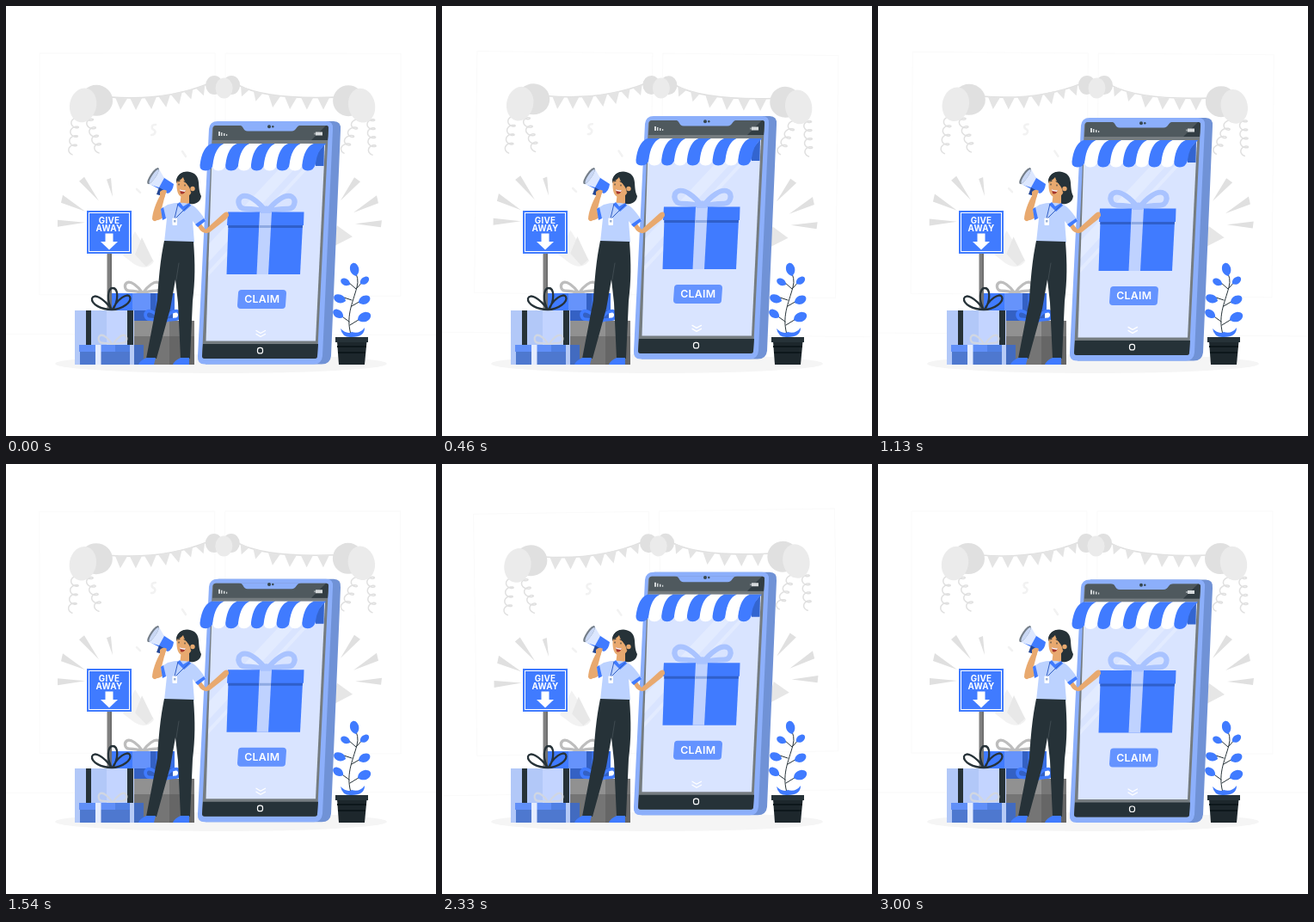
An HTML page for the animation above (3040 ms loop, 500x500 px).

```html
<!DOCTYPE html>
<html lang="en">
<head>
<meta charset="utf-8">
<title>Giveaway</title>
<style>
html, body { margin: 0; width: 100%; height: 100%; overflow: hidden; background: #fff; }
svg { display: block; width: 100vw; height: 100vh; }
text { font-family: Inter, "Open Sans", sans-serif; font-weight: 700; fill: #fff; text-anchor: middle; }
.line { fill: none; stroke-linecap: round; stroke-linejoin: round; }
.blue { fill: #407bff; }
.dark { fill: #263238; }
.skin { fill: #e8a96f; }
.pale { fill: #ebebeb; }
.grey { fill: #e0e0e0; }
</style>
</head>
<body>
<svg viewBox="0 0 500 500">
  <defs>
    <path id="bow" class="line" d="M0 0C-6-9-15-16-20-13C-24-10-22-3-17-3C-10-3-5-2 0 0C5-2 10-3 17-3C22-3 24-10 20-13C15-16 6-9 0 0"/>
    <path id="leaf" class="blue" d="M0 0C1-6 7-9 12-8C18-7 18-1 13 2C8 5 3 3 0 0Z"/>
    <clipPath id="glass"><path d="M240 160H371L360 389.500H232.500Z"/></clipPath>
  </defs>

  <g id="scene">
    <g class="line" stroke="#fafafa">
      <path d="M39 55H243V336H39ZM255 55H459V337H255ZM0 382H500"/>
    </g>
    <path d="M150 262L172 297C166 306 157 305 149 300L136 290Z" fill="#f2f2f2"/>
    <path d="M158 269L171 296L163 303L150 289Z" fill="#e8e8e8"/>
    <path d="M385 255L403 268L378 281Z" fill="#e6e6e6"/>
    <g class="line" stroke="#f2f2f2" stroke-width="2.500">
      <path d="M174 138C168 138 169 143 172 144C175 146 173 150 169 150M205 169L209 175M152 213L156 217"/>
    </g>
    <g class="grey">
      <path d="M91 199L85 204L108 227ZM122 200L117 202L124 222ZM66 220L64 229L92 239ZM60 249V257L92 252Z"/>
      <path d="M405 199L412 204L389 226ZM431 220L433 229L404 240ZM437 249L436 257L406 253Z"/>
    </g>
    <g class="line" stroke="#e0e0e0" stroke-width="1.600">
      <path d="M120 106Q185 111 236 90M270 92Q302 109 384 106"/>
    </g>
    <g id="flags" fill="#e4e4e4"></g>
    <g id="curls" class="line" stroke="#e0e0e0" stroke-width="1.500"></g>
    <g class="grey">
      <ellipse cx="105" cy="110" rx="19" ry="18"/><ellipse cx="398" cy="110" rx="18" ry="18"/>
      <ellipse cx="242" cy="92" rx="10" ry="11"/><ellipse cx="262" cy="92" rx="10" ry="11"/>
    </g>
    <g class="pale">
      <ellipse cx="89.500" cy="115.500" rx="15.500" ry="20" transform="rotate(12 89.500 115.500)"/>
      <ellipse cx="413.500" cy="115.500" rx="15.500" ry="20" transform="rotate(-12 413.500 115.500)"/>
      <ellipse cx="253.500" cy="95.500" rx="10" ry="12"/>
    </g>
  </g>

  <ellipse cx="250" cy="416" rx="193" ry="11" fill="#f5f5f5"/>

  <g id="phone">
    <path d="M247 134H381Q390 134 389 144L378 407Q377 416.500 367 416.500H232Z" fill="#7092d6"/>
    <path d="M246 134H372Q381 134 380 143L368 407Q367 416.500 358 416.500H231Q222 416.500 223 407L236 143Q237 134 246 134Z" fill="#8caffb"/>
    <path d="M244 139H372Q375 139 375 142L362 407Q362 410 359 410H231Q228 410 228 407L240 142Q241 139 244 139Z" fill="#757c80"/>
    <path d="M244 139H372Q375 139 375 142L374 156H240L241 142Q241 139 244 139Z" fill="#4f595e"/>
    <path d="M372 139Q375 139 375 142L374 156H355Z" fill="#323d43"/>
    <path d="M229 393H363L362 407Q362 410 359 410H231Q228 410 228 407Z" class="dark"/>
    <path d="M240 160H371L360 389.500H232.500Z" fill="#d9e4ff"/>
    <path d="M271 138.500C277 139 275 145.500 281 145.500H332C338 145.500 337 139 343 138.500Z" fill="#8caffb"/>
    <circle cx="306" cy="140.300" r="2" fill="#37474f"/><circle cx="310.300" cy="140.300" r="1.200" fill="#37474f"/>
    <path d="M247 146h2v5h-2zM250 147h1.500v4H250zM253 148h1.500v3H253zM256 149h1.200v2H256zM360 146.500h8v4h-8zM358.500 147.500h1v2h-1z" fill="#d5d9db"/>
    <g fill="#fff" opacity=".25" clip-path="url(#glass)">
      <path d="M348 157L370 137L382 139L230 304V283Z"/><path d="M380 152V158L228 322V316Z"/>
    </g>

    <path d="M370 161L369.500 186H360Q358 181 362 171Z" fill="#3365d0"/>
    <g id="awning"></g>

    <g stroke="#a9c3ff" stroke-width="4.200" transform="translate(303 240) scale(1.470 1.400)"><use href="#bow"/></g>
    <path d="M258.500 254H345L342 312H256.500Z" class="blue"/>
    <path d="M258.500 254H345L344.700 258H258.300Z" fill="#2f5fca"/>
    <path d="M258 239.500H346.500L346 255H257Z" class="blue"/>
    <path d="M295 239.500H309L305 312H291.500Z" fill="#bfd2ff"/>
    <path d="M294.500 255H308L307.800 258H294.300Z" fill="#8faae2"/>
    <path d="M296 234Q303 231 309 234L308 241H296Z" fill="#a9c3ff"/>

    <path d="M274 330H322Q326 330 326 334L325 348Q325 352 321 352H273Q269 352 269 348L270 334Q270 330 274 330Z" fill="#6493ff"/>
    <text x="297.800" y="345.400" font-size="12.300" letter-spacing=".3" style="font-weight:600">CLAIM</text>
    <path class="line" stroke="#fff" stroke-width="1.300" d="M291 377.500L296 380.500L301.500 377.500M291 381.500L296 384.500L301.500 381.500"/>
    <rect x="292.500" y="397.500" width="6" height="6.500" rx="2.500" fill="none" stroke="#fff" stroke-width="1.200"/>
  </g>

  <!-- presents -->
  <g stroke="#bdbdbd" stroke-width="3.500" transform="translate(159 334) scale(.930)"><use href="#bow"/></g>
  <path d="M121 334H147V354H121Z" class="blue"/>
  <path d="M123 354H194V366H123Z" fill="#3461c4"/>
  <path d="M147 334H168V354H147Z" fill="#6693fb"/>
  <path d="M168 334H196V354H168Z" fill="#3a6fe4"/>
  <path d="M168 334H174V366H168Z" fill="#3461c4"/>
  <path d="M146 366H219V417H146Z" fill="#757575"/>
  <path d="M146 366H190V384H146Z" fill="#919191"/>
  <path d="M190 366H219V384H190Z" fill="#777"/>
  <path d="M190 384H219V417H190Z" fill="#666"/>
  <path d="M204 366H210V417H204Z" fill="#555"/>
  <g stroke="#407bff" stroke-width="4" transform="translate(182 367) scale(.900)"><use href="#bow"/></g>

  <path d="M117.500 286H123V355H117.500Z" fill="#808080"/>
  <path d="M121 286H123V355H121Z" fill="#707070"/>
  <rect x="94" y="238" width="52" height="50" class="blue"/>
  <rect x="96.500" y="240.500" width="47" height="45" fill="none" stroke="#fff"/>
  <text x="120" y="253" font-size="9.800" letter-spacing=".25">GIVE</text>
  <text x="120" y="262" font-size="9.800" letter-spacing=".25">AWAY</text>
  <path d="M115.500 264.500H124.500V274H130L120 283.500L110 274H115.500Z" fill="#fff"/>

  <path d="M80 354H149V417H80Z" fill="#b2c8f8"/>
  <path d="M117 354H149V396H117Z" fill="#c3d4ff"/>
  <path d="M93 354H99V394H93ZM141 354H148V394H141Z" class="dark"/>
  <path class="line" stroke="#263238" stroke-width="2.300" transform="translate(123 353)"
    d="M0 0C-10-14-21-19-23-13C-24-6-12 0 0 0C-6-10-5-25 1-25C8-25 8-10 1 0C6-12 18-20 21-15C24-9 12 0 0 0"/>
  <g stroke="#d0d6e2" stroke-width="2.800" transform="translate(124 394) scale(.740 .820)"><use href="#bow"/></g>
  <path d="M85 394H160V402H85Z" fill="#608ff8"/>
  <path d="M86 402H159V417H86Z" fill="#4e78cf"/>
  <path d="M127 394H145V402H127Z" fill="#5080e4"/>
  <path d="M104 394H110.500V417H104Z" fill="#e4ecff"/>
  <path d="M144 394H149V417H144Z" fill="#b6caf6"/>
  <path d="M149 394H160V417H149Z" fill="#426bc0"/>

  <!-- woman -->
  <g transform="translate(0 1)">
    <path d="M198 204C198 193 210 188 219 194C227 200 222 210 227 220C226 229 217 231 208 228L206 214Z" class="dark"/>
    <path d="M204 216L213 217V231Q207 237 202 231Z" class="skin"/>
  </g>
  <path d="M188 232C180 237 176 244 174 248C177 252 185 244 190 240Z" class="skin"/>
  <path d="M180 219C174 229 170 241 170 248Q173 253 178 247L185 220Z" class="skin"/>
  <path d="M222 247L232 260L253 241Q259 237 259 244L256 248L237 263Q231 266 226 261L218 249Z" class="skin"/>
  <path d="M188 231Q201 227 213 230Q221 232 232 249L222 256L217 250L219 275H184L187 247L182 246L180 236Z" fill="#bcd2ff"/>
  <path d="M180 236L183 234L186 247L182 249ZM220 254L230 247L232 250L223 257Z" class="blue"/>
  <path d="M202 228L206 233L213 229L215 232L207 239L199 231Z" class="blue"/>
  <path class="line" stroke="#315fc5" d="M200 230L196 247M213 231L197 247"/>
  <rect x="193.500" y="246.500" width="5.500" height="8.500" rx=".8" fill="#fff"/><path d="M195 249H197.500V251.500H195Z" fill="#9db3d7"/>
  <g transform="translate(0 1)">
    <path d="M199 200C205 195 217 198 217 208C217 217 212 223 205 221C198 220 198 207 199 200Z" class="skin"/>
    <path d="M198 203C199 190 215 189 220 198C223 206 220 213 215 216C214 207 208 206 206 198Q203 202 198 203Z" class="dark"/>
    <circle cx="217" cy="211.500" r="2.700" class="skin"/>
    <path d="M202 212Q206 214 209 213Q207 219 203 217Z" fill="#a5352d"/><path d="M202 212Q206 214 209 213L208 215L202.500 214Z" fill="#fff"/>
    <path class="line" stroke="#263238" d="M201 206V207M208 207V208M200 203L202 202.500M207 203L210 204.500"/>
  </g>
  <path d="M184 273L218 274C220 300 220 319 217 343L214 410H203L200 345L197 318L191 352L175 410H163L176 342C178 311 180 293 184 273Z" class="dark"/>
  <path class="line" stroke="#465157" stroke-width=".8" d="M198 318L201 299"/>
  <path d="M163 409H174L172 417H154Q155 413 163 409ZM203 409H213V417H194Q196 412 203 409Z" class="blue"/>
  <path d="M178 196L195 207Q194 216 188 218L169 208Z" class="blue"/>
  <path d="M177 188L184 200L178 211L165 207Z" fill="#dce7ff"/>
  <ellipse cx="171" cy="197.500" rx="3.300" ry="11.300" transform="rotate(34 171 197.500)" fill="#757f8a"/>
  <ellipse cx="172" cy="198" rx="2.200" ry="9.500" transform="rotate(34 172 198)" fill="#c9d7f4"/>
  <path d="M178 211L185 215L182 221L175 219Z" fill="#244795"/>
  <path d="M179 216Q183 212 187 215L184 223L179 224Z" class="skin"/>

  <!-- plant -->
  <path class="line" stroke="#263238" d="M402 385C394 362 403 346 408 327Q411 316 405 308M402 342L393 339M402 349L414 342M399 367L388 359M400 371L413 363M407 329L398 321M408 328L416 319"/>
  <g id="leaves"></g>
  <path d="M402 385Q391 386 389 375Q396 382 402 379Q411 382 417 374Q417 385 402 385Z" class="blue"/>
  <path d="M385 390H419.500L417 417H387Z" fill="#1d272c"/>
  <path d="M383 385H421V391H383Z" class="dark"/>
  <path d="M385 396H419M386 403H418" stroke="#0d171b" stroke-width="2"/>
</svg>
<script>
const $ = id => document.getElementById(id);
const fill = (id, items, draw) => $(id).innerHTML = items.map(draw).join("");

// x, y, tilt of each pennant
const flags = [[134, 107, 4], [151, 107, 0], [168, 106, -4], [184, 104, -9], [198, 101, -13], [212, 98, -17], [226, 94, -20],
  [278, 95, 22], [293, 100, 14], [312, 104, 8], [331, 106, 4], [350, 106.5, 1], [369, 106.5, 0]];
fill("flags", flags, ([x, y, a]) => {
  const w = x > 200 && x < 300 ? 5.5 : 7;
  return `<path d="M${-w} 0H${w}L0 ${w * 2}Z" transform="translate(${x} ${y}) rotate(${a})"/>`;
});

// curly ribbons: start point, end point
const curls = [[81, 131, 77, 173], [96, 133, 108, 171], [424, 133, 426, 173], [409, 133, 393, 171]];
fill("curls", curls, ([x, y, u, v]) => {
  let d = "";
  for (let i = 0; i <= 80; i++) {
    const k = i / 80, a = k * Math.PI * 8;
    const px = x + (u - x) * k + 4.5 * Math.sin(a), py = y + (v - y) * k + 3 * (Math.cos(a) - 1);
    d += (i ? "L" : "M") + px.toFixed(1) + " " + py.toFixed(1);
  }
  return `<path d="${d}"/>`;
});

fill("awning", [...Array(9).keys()], i =>
  `<path transform="translate(${i * 14.85})" fill="${i % 2 ? "#fff" : "#407bff"}"
    d="M239 160H253.500Q243 167 241 184Q239 191.500 232 191.500Q225 191 225.500 185Q228 164 239 160Z"/>`);

// x, y, rotation, scale; a negative scale faces left
const leaves = [[407, 314, 62, -.9], [400, 324, 15, -.7], [412, 323, -22, .7], [395, 343, 5, -.85],
  [410, 345, -10, .85], [392, 362, 20, -.8], [409, 365, -8, .95]];
fill("leaves", leaves, ([x, y, a, s]) =>
  `<use href="#leaf" transform="translate(${x} ${y}) rotate(${a}) scale(${s} ${Math.abs(s)})"/>`);

const LOOP = 3040;
const triangle = p => 1 - Math.abs(1 - 2 * (p % 1));

function frame() {
  const p = (performance.now() + 40) % LOOP / LOOP;
  const rise = 10 * triangle(p * 2);
  const sway = 2 * triangle(p + .25) - 1;
  $("phone").setAttribute("transform", `translate(0 ${.5 - rise})`);
  $("scene").setAttribute("transform", `rotate(${sway} 250 218)`);
  requestAnimationFrame(frame);
}
frame();
</script>
</body>
</html>
```
